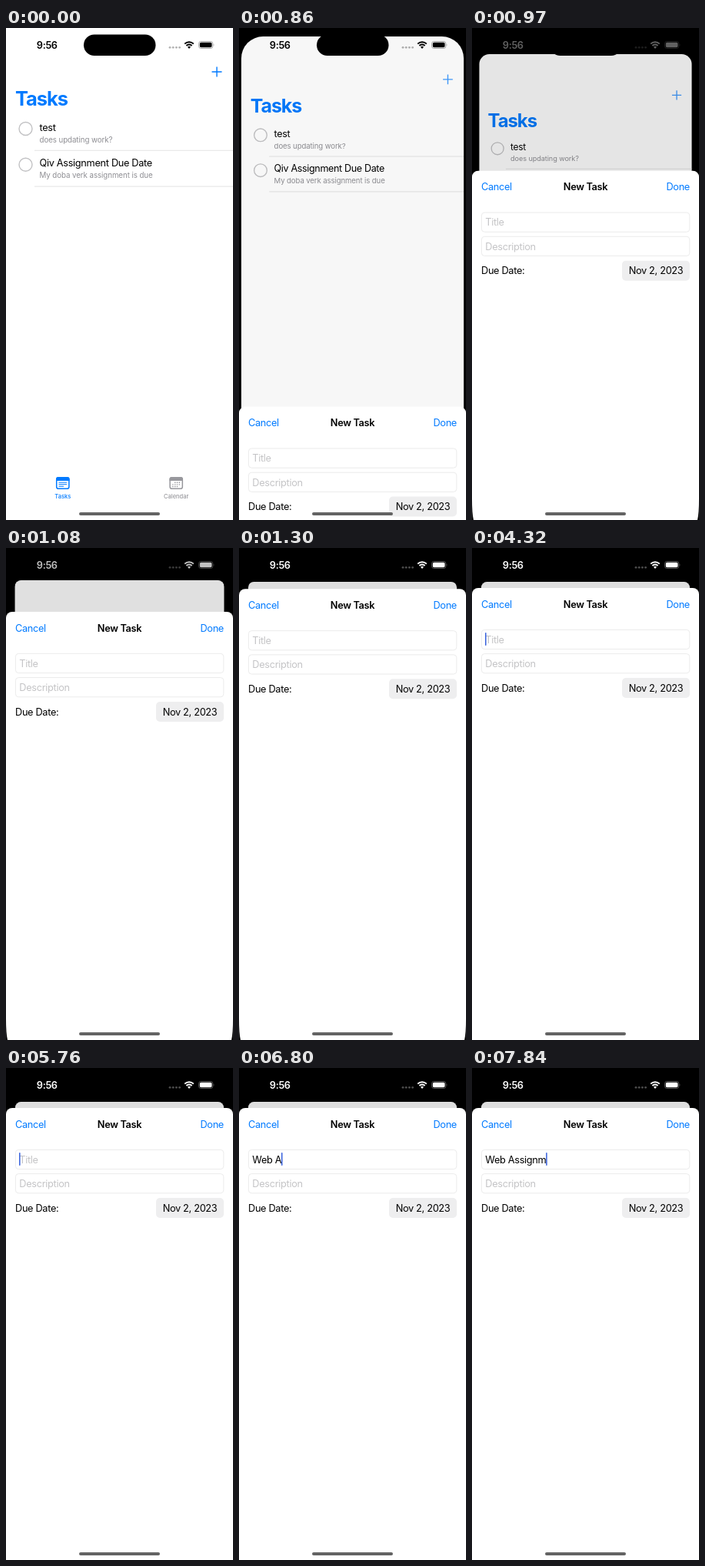
Write an HTML page that moves like this. It is 295 px wide and 640 px high and loops after 8 s.

```html
<!DOCTYPE html>
<html lang="en">
<head>
<meta charset="utf-8">
<title>Task list</title>
<style>
html, body { margin: 0; width: 100%; height: 100%; overflow: hidden; background: #000; }
svg { display: block; width: 100%; height: 100%; }
text { font: 12.76px Inter, "Liberation Sans", sans-serif; letter-spacing: -.32px; white-space: pre; }
.bold { font-weight: 600; }
.big { font-size: 25.5px; font-weight: 700; letter-spacing: -1.1px; }
.sub { font-size: 9.76px; letter-spacing: -.08px; fill: #8e8e93; }
.tab { font-size: 7.5px; font-weight: 500; letter-spacing: 0; text-anchor: middle; }
.mid { text-anchor: middle; }
.end { text-anchor: end; }
.blue { fill: #007aff; }
.hint { fill: #c4c4c6; }
.box { fill: #fff; stroke: #e6e6e6; stroke-width: .8; }
.line { fill: none; stroke: currentColor; }
</style>
</head>
<body>
<svg viewBox="0 0 295 640">
  <defs>
    <clipPath id="clip"><rect id="corners" width="295" height="720"/></clipPath>
    <g id="frame">
      <rect class="line" x="65.7" y="584.7" width="16.2" height="14.6" rx="2.6" stroke-width="1.5"/>
      <path d="M65 589V587q0-3 3-3h11.600q3 0 3 3v2z" fill="currentColor"/>
    </g>
    <g id="row">
      <circle cx="25.500" cy="131" r="8.500" fill="none" stroke="#c2c2c4" stroke-width="1.400"/>
      <path d="M37 159.300H295" stroke="#dcdcdc" stroke-width=".8"/>
    </g>
  </defs>

  <g id="page" clip-path="url(#clip)">
    <rect width="295" height="720" fill="#fff"/>
    <path id="plus" d="M267.500 57h13M274 50.500v13" stroke="#007aff" stroke-width="1.400"/>
    <text class="big blue" x="12" y="101">Tasks</text>
    <use href="#row"/>
    <text x="43.500" y="133.500">test</text>
    <text class="sub" x="43.500" y="148.500">does updating work?</text>
    <use href="#row" y="46.800"/>
    <text x="43.500" y="180">Qiv Assignment Due Date</text>
    <text class="sub" x="43.500" y="195.200">My doba verk assignment is due</text>
    <g color="#007aff">
      <use href="#frame"/>
      <path class="line" d="M68.500 591.200h10.500M68.500 593.700h10.500M68.500 596.200h6.500"/>
    </g>
    <text class="tab blue" x="73.800" y="611.500">Tasks</text>
    <g color="#98989d">
      <use href="#frame" x="147.400"/>
      <path class="line" stroke-width="1.400" stroke-dasharray="1.400 1.400"
        d="M219 591.300h7.500M216.200 593.900h10.300M216.200 596.500h7.500"/>
    </g>
    <text class="tab" x="221.200" y="611.500" fill="#98989d">Calendar</text>
    <rect id="dim" width="295" height="720"/>
  </g>

  <rect x="101" y="8.500" width="93.500" height="27.500" rx="13.750"/>
  <g id="status" fill="currentColor">
    <text class="bold" x="39.800" y="26.600">9:56</text>
    <g opacity=".3">
      <circle cx="213" cy="25.300" r="1.400"/><circle cx="217.200" cy="25.300" r="1.400"/>
      <circle cx="221.400" cy="25.300" r="1.400"/><circle cx="225.600" cy="25.300" r="1.400"/>
    </g>
    <path class="line" stroke-width="1.900" d="M232.200 20.700A8.200 8.200 0 0 1 243.800 20.700M234.400 23A5 5 0 0 1 241.600 23"/>
    <path d="M238 27l-2-2.200A2.900 2.900 0 0 1 240 24.800z"/>
    <rect class="line" x="250.500" y="17.500" width="18.300" height="9" rx="2.800" stroke-width=".8" opacity=".4"/>
    <rect x="251.800" y="18.800" width="15.700" height="6.400" rx="1.700"/>
    <path d="M269.800 20.500q1.300 1.500 0 3z" opacity=".45"/>
  </g>

  <g id="sheet">
    <rect width="295" height="720" rx="8" fill="#fff"/>
    <text class="blue" x="12" y="25.600">Cancel</text>
    <text class="bold mid" x="147.500" y="25.600">New Task</text>
    <text class="blue end" x="283" y="25.600">Done</text>
    <rect class="box" x="12.400" y="54.400" width="270.400" height="25.200" rx="4"/>
    <rect class="box" x="12.400" y="85.600" width="270.400" height="25.200" rx="4"/>
    <text id="entry" x="17.300" y="71.600"></text>
    <text class="hint" id="hint" x="17.300" y="71.600">Title</text>
    <rect id="caret" y="58" width="1.600" height="17" rx=".8" fill="#4068de"/>
    <text class="hint" x="17.300" y="103">Description</text>
    <text x="12" y="134.600">Due Date:</text>
    <rect x="195" y="117" width="88" height="26" rx="5" fill="#eeeeef"/>
    <text class="mid" x="239" y="134.600">Nov 2, 2023</text>
  </g>
  <path id="edges" d="M0 612q0 20 2 28H0zM295 612q0 20-2 28h2z"/>
  <rect x="95" y="630" width="105" height="4" rx="2" fill="#636363"/>
</svg>

<script>
const $ = id => document.getElementById(id);
const set = (id, attrs) => {
  for (const name in attrs) $(id).setAttribute(name, attrs[name]);
};
const clamp = v => Math.max(0, Math.min(1, v));

const LOOP = 8000;
const TYPED = "Web Assignm";
const KEYS = [5890, 6000, 6150, 6390, 6800, 7080, 7270, 7380, 7570, 7840, 7840];

// The screen refreshes in coarse steps while the sheet rises.
function held(t) {
  if (t < 500) return 0;
  if (t < 640) return 500;
  if (t < 1300) return 640 + 110 * Math.floor((t - 640) / 110);
  return t < 2220 ? 1300 : t;
}

// Critically damped spring
function rise(t) {
  if (t >= 2220) return 1;
  const x = Math.max(0, t - 803) * 0.0169;
  return 1 - (1 + x) * Math.exp(-x);
}

function caretAlpha(t) {
  if (t < 2360) return 0;
  if (t < 2980) return t < 2480 ? 0.5 : 1;
  if (t < 3180) return 0;
  if (t >= 5760) return 1;
  const phase = (t - 3180) % 1020;
  if (phase >= 780) return 0;
  return phase < 120 || phase >= 660 ? 0.5 : 1;
}

function draw(t) {
  const step = held(t), p = rise(step);
  set("page", { transform: `translate(${12 * p} ${44 * p}) scale(${1 - 24 * p / 295})` });
  set("corners", { rx: p ? 36 - 28 * p : 0 });
  set("dim", { opacity: 0.13 * p });
  set("plus", { opacity: step < 500 ? 1 : 0.35 + 0.4 * clamp((step - 500) / 360) });
  set("sheet", { transform: `translate(0 ${640 - 588 * p})` });
  set("edges", { opacity: step >= 970 && step < 2220 ? 1 : 0 });
  const tone = Math.round(255 * clamp((step - 860) / 290));
  set("status", { color: `rgb(${tone},${tone},${tone})` });

  const count = KEYS.filter(k => k <= t).length;
  $("entry").textContent = TYPED.slice(0, count);
  set("hint", { opacity: count ? 0 : 1 });
  const width = count ? $("entry").getComputedTextLength() : 0;
  set("caret", { x: 17 + width, opacity: caretAlpha(t) });
}

const start = performance.now();
function tick() {
  draw((performance.now() - start) % LOOP);
  requestAnimationFrame(tick);
}
tick();
</script>
</body>
</html>
```
